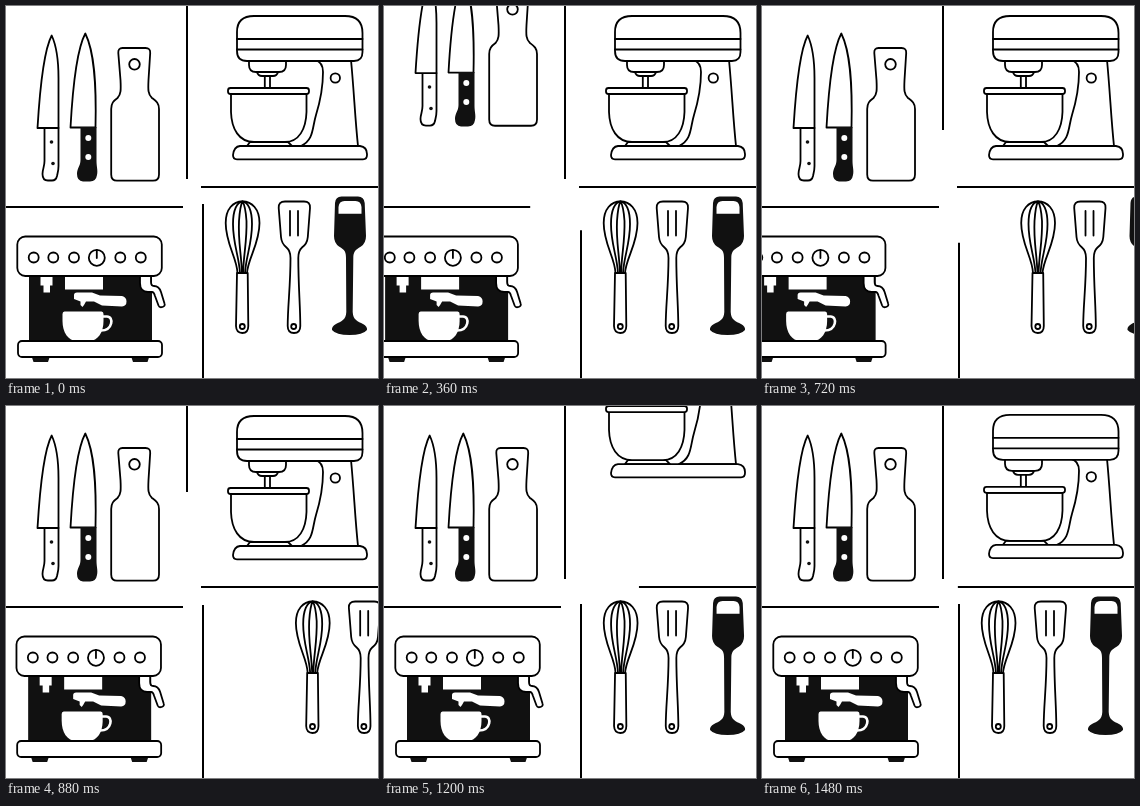
These frames come from a looping animation (372x372 px, 1.52 s). An HTML page:

```html
<!DOCTYPE html>
<html lang="en">
<head>
<meta charset="utf-8">
<title>Kitchen tools</title>
<style>
  html, body { margin: 0; width: 100%; height: 100%; overflow: hidden; background: #fff; }
  svg { display: block; width: 100vw; height: 100vh; }
  g { fill: #fff; stroke: #000; stroke-width: 1.8; stroke-linejoin: round; stroke-linecap: round; }
  .solid { fill: #111; stroke: none; }
  .cut { fill: #fff; stroke: none; }
  .open { fill: none; }
  .wall { stroke: #000; stroke-width: 2; }
</style>
</head>
<body>
<svg viewBox="0 0 372 372">
  <line id="wallLeft" class="wall" x1="0" y1="201" x2="177" y2="201"/>
  <line id="wallBottom" class="wall" x1="197" y1="198" x2="197" y2="372"/>
  <line id="wallTop" class="wall" x1="181" y1="0" x2="181" y2="173"/>
  <line id="wallRight" class="wall" x1="195" y1="181" x2="372" y2="181"/>

  <g id="knives">
    <path d="M38.500 122V155C38.500 161 36.500 163 36.500 168Q36.500 174.500 42 174.500H46Q50 174.500 51 170C51.500 167 52.500 165 52.500 160V122Z"/>
    <path d="M45.700 29.500C39 42 34.500 72 31.500 122H52.500V72C52.500 54 50.500 40 45.700 29.500Z"/>
    <circle class="solid" cx="45.500" cy="136" r="1.800"/>
    <circle class="solid" cx="47" cy="157.500" r="1.800"/>
    <path d="M79.300 27.500C71.500 42 67 76 64.500 121.500H89.500C90.500 78 88.500 46 79.300 27.500Z"/>
    <path class="solid" d="M74.500 121H90.500V155C90.500 161 92 164 91 169Q90 175.500 84 175.500H77Q71 175 71 168C71 162 74.500 160 74.500 154Z"/>
    <circle class="cut" cx="82.300" cy="132" r="3"/>
    <circle class="cut" cx="82.300" cy="151" r="3"/>
    <path d="M116.500 42H139.500Q144.500 42 144.200 47L142.500 74C142 84 142 88.500 146 92C150 95 153 97 153 103V168.500Q153 174.700 147 174.700H111Q105.200 174.700 105.200 168.500V103C105.200 97 107.500 95 111.500 92C115 88.500 115 84 114.500 74L112.300 47Q112 42 116.500 42Z"/>
    <circle cx="128.500" cy="58.300" r="5.300"/>
  </g>

  <g id="espresso">
    <path class="solid" d="M23 268H146V337H23ZM25.500 350H44L42 356H27.500ZM125 350H143.500L141.500 356H127Z"/>
    <path class="cut" d="M34.500 270H46.500V279.500H44V286.500H37.500V279.500H34.500ZM59 270H97V283.500H59Z"/>
    <path class="cut" d="M68 289Q68 286.500 71 286.500H86L94 289.500L116 290Q120.500 291 120.500 295.500T116 300.500L96 299.500L88 295.500H80L78 299L76.500 301L74.500 299V295.500L68 293Z"/>
    <path class="cut" d="M58.500 305.500H95.500Q97.500 305.500 97.500 308V315C97.500 326 92 335 83 335H71C62 335 56.500 326 56.500 315V308Q56.500 305.500 58.500 305.500Z"/>
    <path class="open" d="M96 310.500H101C108 310.500 107 324.500 95 324.500" style="stroke:#fff;stroke-width:2.600"/>
    <path d="M134 268V277Q134 286 142 286H146Q148 286 149 290L152.500 299.500Q153.500 302 156.500 301T158.500 297.500L155 286Q153 280 148 280Q145 280 145 276V268Z"/>
    <rect x="11.300" y="230.500" width="144.500" height="39.500" rx="8"/>
    <circle cx="27.700" cy="251.500" r="5"/>
    <circle cx="47.300" cy="251.500" r="5"/>
    <circle cx="68" cy="251.500" r="5"/>
    <circle cx="90.800" cy="251.800" r="8"/>
    <path d="M90.800 244V252"/>
    <circle cx="114.300" cy="251.500" r="5"/>
    <circle cx="134.800" cy="251.500" r="5"/>
    <rect x="12" y="335" width="144" height="16" rx="4"/>
  </g>

  <g id="utensils">
    <path class="open" d="M231.500 267C231 252 219.700 238 219.700 217C219.700 203 227 195.500 236.500 195.500S253.500 203 253.500 217C253.500 238 242 252 241 267"/>
    <path class="open" d="M234 267C233 250 227 238 227 218C227 204 231 196 236.500 195.500C242 196 246 204 246 218C246 238 240 250 239 267"/>
    <path class="open" d="M236 267C235 245 232 235 233 215Q234 200 236.500 195.500Q239.500 200 240.500 215C241 235 238 245 237 267"/>
    <path d="M231 267H241.700L242.300 320Q242.300 327 236.300 327T230 320Z"/>
    <circle cx="236.300" cy="320.500" r="2.500"/>
    <path d="M279 195.500H298Q304.500 195.500 304 202L301.800 231C301.300 237 299 239 296 241.500C293 244 292.300 247 292.300 252C292.300 280 294.300 300 294.300 320Q294.300 327 288 327T281.700 320C281.700 300 284.500 280 284.500 252C284.500 247 283.500 244 280.500 241.500C277.500 239 275.500 237 275 231L272.700 202Q272.300 195.500 279 195.500Z"/>
    <path d="M284 205V229.500M292 205V229.500"/>
    <circle cx="287.700" cy="320.500" r="2.500"/>
    <path class="solid" d="M335.500 190.500H352Q358 190.500 358.700 197L360 230Q360 237 355 240.500C349 244 347.300 246 347.300 252L346.700 306C347 314 352 315.500 357 318Q361.500 320.500 361 324Q357 329 343.500 329T326 324Q325.500 320.500 330 318C335 315.500 340 314 340.300 306L340 252C340 246 339 244 333 240.500Q328 237 328 230L329 197Q329.500 190.500 335.500 190.500Z"/>
    <path class="cut" d="M332.500 207.700V201Q333 195 338.500 195H349.500Q355 195 355.500 201V207.700Z"/>
  </g>

  <g id="mixer">
    <path d="M309 54Q317 56 317 66C317 82 314 96 310 109C306 122 308 134 295 140H352C349 112 348 85 345 54Z"/>
    <path d="M244 136L241 140H286L282 136Z"/>
    <path d="M225 88V106C225.500 123 233 136 248 136H279C293 136 300 123 300.500 106V88Z"/>
    <path d="M258.800 70H264V82H258.800ZM251 66H272Q271 70 267 70H256Q252 70 251 66Z"/>
    <path d="M243 54V59Q243 66 250 66H273Q280 66 280 59V54Z"/>
    <rect x="222" y="82" width="81" height="6" rx="2.500"/>
    <path d="M231 45V26Q231 10 248 10H339Q356.500 10 356.500 27V46Q356.500 55 348 55H241Q231 55 231 45Z"/>
    <path d="M231 33H356.500M231 43.500H356.500"/>
    <circle cx="329.300" cy="72" r="4.700"/>
    <path d="M234 140H354Q361 141 361 148V149Q361 153.300 357 153.300H231Q227 153.300 227 149Q228 140.500 234 140Z"/>
  </g>
</svg>
<script>
const LOOP = 1520, STEP = 301.5, FRAME = 40;
const el = id => document.getElementById(id);

// Each tool slides out and back while the wall beside it shrinks.
const parts = [
  { tool: "knives",   dy: -78.5, wall: "wallLeft",   attr: "x2", rest: 177, change: -44 },
  { tool: "espresso", dx: -73,   wall: "wallBottom", attr: "y1", rest: 198, change: 87.5 },
  { tool: "utensils", dx: 71,    wall: "wallTop",    attr: "y2", rest: 173, change: -88 },
  { tool: "mixer",    dy: -82,   wall: "wallRight",  attr: "x1", rest: 195, change: 60 }
];

// cubic-bezier(0, 0, .58, 1)
function easeOut(x) {
  let low = 0, high = 1;
  for (let i = 0; i < 24; i++) {
    const s = (low + high) / 2;
    if (1.74 * s * s - 0.74 * s ** 3 < x) low = s; else high = s;
  }
  return 3 * low * low - 2 * low ** 3;
}

function slide(u) {
  if (u <= 0 || u >= 2) return 0;
  return u < 1 ? easeOut(u) : 1 - easeOut(u - 1);
}

function draw(time) {
  parts.forEach(({ tool, dx = 0, dy = 0, wall, attr, rest, change }, i) => {
    const k = slide(time / STEP - i);
    el(tool).setAttribute("transform", `translate(${dx * k} ${dy * k})`);
    el(wall).setAttribute(attr, rest + change * k);
  });
}

const start = performance.now();
function tick() {
  const elapsed = performance.now() - start;
  draw(Math.floor(elapsed / FRAME + 0.2) * FRAME % LOOP);
  requestAnimationFrame(tick);
}
tick();
</script>
</body>
</html>
```
